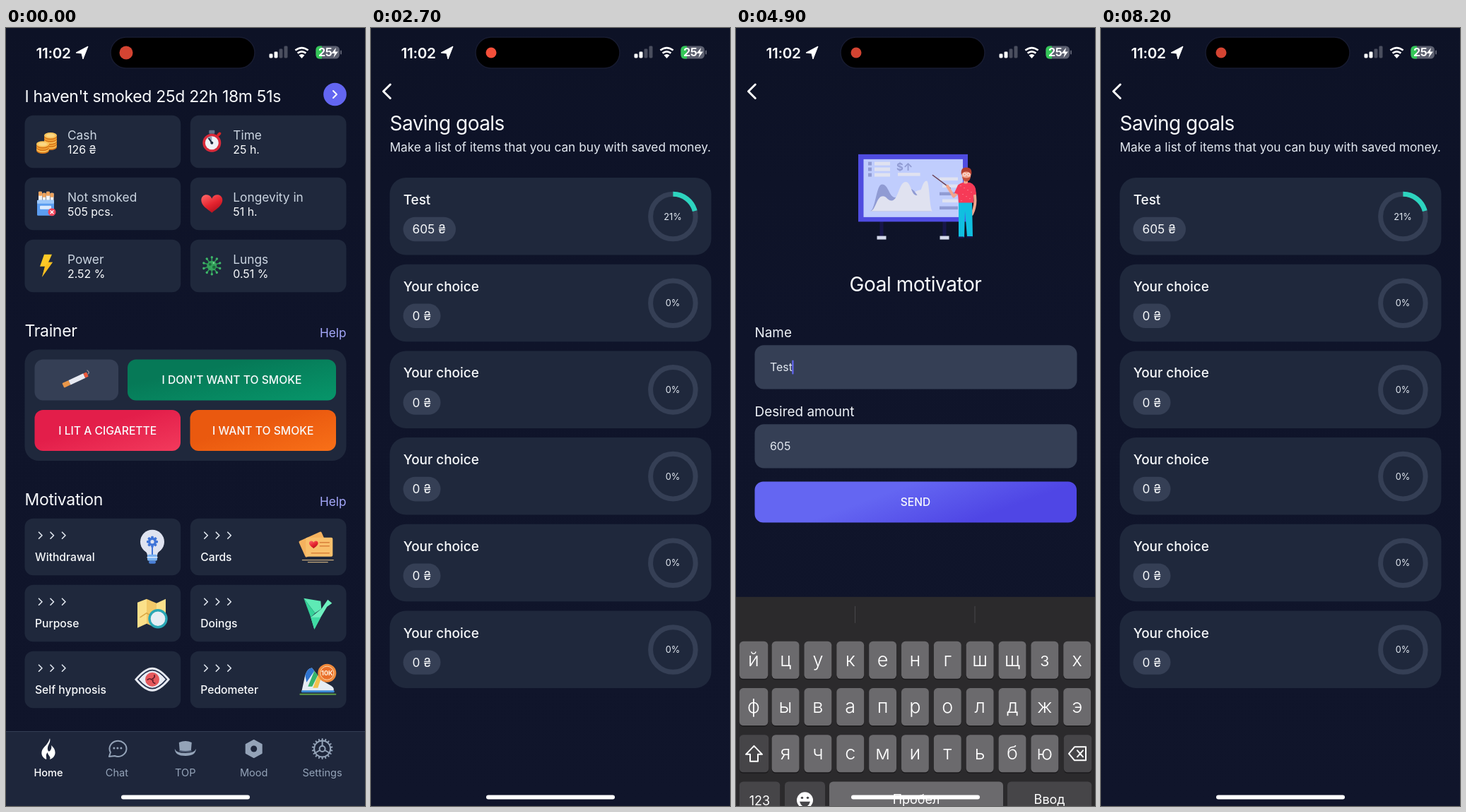
Write an HTML page that moves like this. It is 508 by 1102 pixels and loops after 8.3 s.

```html
<!DOCTYPE html>
<html lang="en">
<head>
<meta charset="utf-8">
<title>Saving goals</title>
<style>
html, body { margin: 0; width: 100%; height: 100%; overflow: hidden; background: #000; }
svg { display: block; width: 100vw; height: 100vh; font-family: Inter, Roboto, "Noto Sans", sans-serif; }
text { white-space: pre; }
</style>
</head>
<body>
<svg id="stage" viewBox="0 0 508 1102" xmlns="http://www.w3.org/2000/svg">
<defs>
  <linearGradient id="bg" x2="0" y2="1"><stop stop-color="#0d1226"/><stop offset=".4" stop-color="#0f142a"/><stop offset="1" stop-color="#10152b"/></linearGradient>
  <linearGradient id="green" x2="1" y2="1"><stop offset=".3" stop-color="#067957"/><stop offset="1" stop-color="#07966a"/></linearGradient>
  <linearGradient id="red" x2="1" y2="1"><stop offset=".4" stop-color="#e31e4a"/><stop offset="1" stop-color="#f23a5c"/></linearGradient>
  <linearGradient id="orange" x2="1" y2="1"><stop offset=".4" stop-color="#ea590f"/><stop offset="1" stop-color="#f87018"/></linearGradient>
  <linearGradient id="indigo" x2="1" y2=".35"><stop offset=".45" stop-color="#6466f2"/><stop offset=".9" stop-color="#4f46e5"/></linearGradient>
  <linearGradient id="heart" x2=".6" y2="1"><stop stop-color="#ff6b6b"/><stop offset=".6" stop-color="#e5242f"/><stop offset="1" stop-color="#b3121f"/></linearGradient>
</defs>
<g id="home"></g>
<g id="goals"></g>
<g id="form"></g>
<g id="backOld"></g>
<g id="backNew"></g>
<g id="status"></g>
</svg>
<script>
const LOOP = 8300, W = 508, H = 1102;
const $ = id => document.getElementById(id);
const CARD = '#1f283c', FIELD = '#353f55', SOFT = '#cbd5e1', GRAY = '#94a3b8', WHITE = '#f8fafc';

// Markup helpers
const rect = (x, y, w, h, r, fill, more = '') =>
  `<rect x="${x}" y="${y}" width="${w}" height="${h}" rx="${r}" fill="${fill}" ${more}/>`;
const circle = (x, y, r, fill, more = '') => `<circle cx="${x}" cy="${y}" r="${r}" fill="${fill}" ${more}/>`;
const oval = (x, y, rx, ry, fill, more = '') =>
  `<ellipse cx="${x}" cy="${y}" rx="${rx}" ry="${ry}" fill="${fill}" ${more}/>`;
const shape = (d, fill, more = '') => `<path d="${d}" fill="${fill}" ${more}/>`;
const line = (d, color, w = 2, more = '') =>
  `<path d="${d}" fill="none" stroke="${color}" stroke-width="${w}" stroke-linecap="round" stroke-linejoin="round" ${more}/>`;
const text = (x, y, s, size, fill = WHITE, more = '') =>
  `<text x="${x}" y="${y}" font-size="${size}" fill="${fill}" ${more}>${s}</text>`;
const mid = 'text-anchor="middle"', medium = 'font-weight="500"';
const at = (x, y, body, more = '') => `<g transform="translate(${x} ${y})" ${more}>${body}</g>`;
const spokes = (n, draw) => Array.from({length: n}, (_, i) =>
  `<g transform="rotate(${i * 360 / n})">${draw}</g>`).join('');
const heading = (y, s, more = '') => text(26.5, y, s, 23, WHITE, 'letter-spacing="-.33" ' + more);
const page = () => rect(0, 0, W, H, 0, 'url(#bg)');

// Icons, each around its own centre
function coins() {
  let s = '';
  const pile = (x, y, n) => {
    for (let i = 0; i < n; i++) {
      s += oval(x, y - i * 3.6 + 2, 9, 4.2, '#d97a1c') + oval(x, y - i * 3.6, 9, 4.2, i % 2 ? '#f5a93a' : '#fbc55c');
    }
    s += oval(x, y - (n - 1) * 3.6, 6, 2.5, '#fbd784');
  };
  pile(6, 6, 5);
  pile(-5, 11, 3);
  return s;
}
const stopwatch = () => rect(-4, -16, 8, 5, 1, '#64748b') + line('M9 -9L11 -11', '#dc2626', 4) +
  circle(0, 2, 13, '#d92a3a') + circle(0, 2, 9.5, '#eef2f7') + shape('M0 2V-7.5A9.5 9.5 0 0 0 -6.7 -4.7Z', '#94a3b8') +
  line('M0 2L-4 -4', '#1e293b', 2) + circle(0, 2, 2, '#1e293b');
function pack() {
  let s = '';
  for (let i = 0; i < 4; i++) s += rect(-11 + i * 5.5, -17 + i % 2 * 2, 5, 16, 1, '#f1f5f9') + rect(-11 + i * 5.5, -17 + i % 2 * 2, 5, 6, 1, '#f0a35b');
  return s + rect(-13, -5, 24, 22, 1.5, '#5b9df0') + rect(-13, -5, 24, 5, 1, '#9cc7fa') + rect(-9, 3, 16, 5, 1, '#dbeafe') +
    circle(8, 12, 5.5, '#f0445b') + line('M6 10L10 14M10 10L6 14', '#fff', 1.4);
}
const heart = () => shape('M0 13C-6 8 -15 3 -15 -5C-15 -14 -3 -15 0 -7C3 -15 15 -14 15 -5C15 3 6 8 0 13Z', 'url(#heart)');
const bolt = () => shape('M-3 -16H8L3 -5H9L-6 16L-2 1H-9Z', '#fcc927') + shape('M3 -5H9L-6 16L-2 1Z', '#f6b51c', 'opacity=".5"');
const virus = () => spokes(10, line('M0 -6V-12', '#2f9e57', 1.6) + circle(0, -12, 1.7, '#3fb76a')) +
  circle(0, 0, 7, '#35a35c') + circle(-2.5, -2, 2, '#1d6b3d') + circle(3, 2, 2.3, '#1d6b3d') + circle(2.5, -4, 1.2, '#7ddc9a');
const cigarette = () => `<g transform="rotate(-25)">${rect(-20, -3.5, 10, 7, 1, '#e9974a') + rect(-10, -3.5, 23, 7, 0, '#e8eaf2') +
  rect(13, -3.5, 5, 7, 1, '#ee5a3c')}</g>` + line('M17 -8Q20 -10 16 -13', '#8a8f9c', 1.5);
const bulb = () => circle(0, -7, 17, '#dfe3f0') + shape('M-11 4Q-7 9 -7 13H7Q7 9 11 4Z', '#dfe3f0') +
  at(0, -7, spokes(8, rect(-1.8, -8, 3.6, 5, 1, '#3f74d8')) + circle(0, 0, 6, '#3f74d8') + circle(0, 0, 2.6, '#dfe3f0')) +
  line('M0 0V13', '#3f74d8', 2) + rect(-7, 11, 14, 9, 2, '#7bb2f0') + rect(-5, 20, 10, 4, 2, '#4a7fd6') + line('M-7 15H7', '#dbeafe', 1.5);
const cards = () => `<g transform="rotate(-24)">${rect(-22, -18, 35, 25, 2, '#f5b25e')}</g>` +
  rect(-17, -13, 38, 27, 2, '#f9c06c') + at(-6, -3, `<g transform="scale(.42)">${heart()}</g>`) +
  line('M3 -6H16M3 -1H16M-9 9H16', '#d9813b', 1.6) + line('M-22 19H22M-14 22H14', '#f1c98d', 1);
const map = () => shape('M-21 -15L-8 -20V15L-21 21Z', '#fbe08a') + shape('M-8 -20L6 -14V21L-8 15Z', '#f2c968') +
  shape('M6 -14L19 -20V15L6 21Z', '#fbe08a') + line('M-17 6L-8 0L-2 4', '#d9a441', 1.4) +
  circle(8, 8, 12, '#e6eef4', 'stroke="#2aa7b5" stroke-width="3.4"');
const bird = () => shape('M-20 -21L4 -17L5 -6L-4 0Z', '#5eeab5') + shape('M-20 -21L-4 0L-10 6Z', '#34d399') +
  shape('M-10 6L5 -6L14 -19L20 -14L13 -9L4 6L-5 23Z', '#6ff0c0') + shape('M-10 6L4 6L-5 23Z', '#3fdca4');
const eye = () => shape('M-25 0Q-11 -17 0 -17Q11 -17 25 0Q11 17 0 17Q-11 17 -25 0Z', '#e8ebf3') +
  shape('M-20 0Q-9 -13 0 -13Q9 -13 20 0Q9 13 0 13Q-9 13 -20 0Z', '#e8ebf3', 'stroke="#27324c" stroke-width="1.8"') +
  circle(0, 0, 10, '#e5585c') + spokes(3, line('M0 -1Q4 -2 3 -6', '#5a1a28', 1.6));
const shoe = () => shape('M-23 17L-18 -6Q-14 -17 -8 -16L5 1L19 9Q24 12 22 17Z', '#e6edf5') +
  shape('M-18 -6Q-14 -17 -8 -16L-5 -12L-16 4Z', '#2f74d0') + shape('M-5 -12L0 -6L-8 10H-14Z', '#35b36b') + shape('M0 -6L4 0L0 12H-7Z', '#f2c14d') +
  line('M-25 21H25', '#5e9c46', 2) + line('M-22 17H22', '#3a8ad6', 3) +
  circle(13, -9, 13, '#f08a3c') + circle(13, -9, 9.5, '#ea6f2a', 'stroke="#ffd8a8" stroke-width="1"') +
  text(13, -5.5, '10K', 9, '#fff3e0', mid + ' font-weight="700"');

const tabIcons = [
  () => shape('M2 -15C4 -8 -2 -6 -1 1Q0 6 3 2Q5 -1 4 -5C9 -1 12 6 7 12Q5 14 2 15C4 10 -1 10 -1 5C-5 9 -2 12 -3 15C-11 11 -11 4 -7 -1C-3 -6 0 -8 2 -15Z', '#fff'),
  () => line('M-11 11L-9 5A12 11 0 1 1 -3 10Z', GRAY, 2) + circle(-4, -1, 1.5, GRAY) + circle(1, -1, 1.5, GRAY) + circle(6, -1, 1.5, GRAY),
  () => shape('M-9 -9Q0 -13 9 -9L8 3H-8Z', GRAY) + shape('M-15 0Q-13 6 0 6Q13 6 15 0Q15 10 0 10Q-15 10 -15 0Z', GRAY) + line('M-8 3Q0 5 8 3', '#4b5870', 2),
  () => shape('M0 -12L11 -6V6L0 12L-11 6V-6Z', GRAY, `stroke="${GRAY}" stroke-width="2" stroke-linejoin="round"`) + circle(0, 0, 4.5, '#1e263b'),
  () => spokes(18, line('M0 -12V-14', GRAY, 2)) + circle(0, 0, 11.5, 'none', `stroke="${GRAY}" stroke-width="2"`) +
    spokes(3, line('M0 -4V-11', GRAY, 2)) + circle(0, 0, 4, 'none', `stroke="${GRAY}" stroke-width="2"`)
];

function buildHome() {
  let s = page() + heading(105, '', 'id="counter"') + circle(465.5, 94, 16.3, '#6366f1') + line('M463 89L468 94L463 99', '#fff', 2);
  [['Cash', '126 ₴', coins], ['Time', '25 h.', stopwatch], ['Not smoked', '505 pcs.', pack],
   ['Longevity in', '51 h.', heart], ['Power', '2.52 %', bolt], ['Lungs', '0.51 %', virus]].forEach(([name, value, icon], i) => {
    const x = 26.5 + i % 2 * 234.3, y = 123.7 + (i >> 1) * 88;
    s += rect(x, y, 220.7, 74.5, 12, CARD) + at(x + 30.5, y + 37, icon()) +
      text(x + 60.5, y + 34.5, name, 17.3, SOFT) + text(x + 60.5, y + 54, value, 15.9, WHITE);
  });
  const help = y => text(481.5, y, 'Help', 17.2, '#a5a8fb', 'text-anchor="end"');
  s += heading(437, 'Trainer') + help(438) + rect(26.5, 455.5, 455, 157.5, 20, CARD) +
    rect(40.5, 469.5, 118.5, 58, 12, FIELD) + at(99, 498, cigarette());
  [[172, 469.5, 295, 'green', "I DON'T WANT TO SMOKE"], [40.5, 541, 206.5, 'red', 'I LIT A CIGARETTE'],
   [260.5, 541, 206.5, 'orange', 'I WANT TO SMOKE']].forEach(([x, y, w, fill, label]) => {
    s += rect(x, y, w, 58, 12, `url(#${fill})`) + text(x + w / 2, y + 34.5, label, 15.7, WHITE, mid + ' ' + medium);
  });
  s += heading(676, 'Motivation') + help(677);
  [['Withdrawal', bulb], ['Cards', cards], ['Purpose', map], ['Doings', bird], ['Self hypnosis', eye], ['Pedometer', shoe]].forEach(([name, icon], i) => {
    const x = i % 2 * 234.3, y = 694.7 + (i >> 1) * 94;
    let body = rect(26.5, 0, 220.7, 80.5, 12, CARD) + at(207, 40, icon()) + text(41, 60.5, name, 15.65, WHITE, medium);
    for (let j = 0; j < 3; j++) body += line(`M${46.5 + j * 16.5} 19.5l4.5 4.5l-4.5 4.5`, '#e2e8f0', 1.6);
    s += at(x, y, body, name === 'Purpose' ? 'id="purpose"' : '');
  });
  s += rect(0, 996, W, 106, 0, '#1e263b') + rect(0, 996, W, 1, 0, '#343e54');
  ['Home', 'Chat', 'TOP', 'Mood', 'Settings'].forEach((name, i) => {
    const x = 60 + i * 96.9;
    s += at(x, 1021, tabIcons[i]()) + text(x, 1060, name, 14.6, i ? GRAY : '#fff', mid + (i ? '' : ' ' + medium));
  });
  return s + rect(0, 0, W, H, 0, '#000', 'id="homeDim"');
}

function buildGoals() {
  let s = page() + text(26.5, 144.5, 'Saving goals', 28, WHITE, 'letter-spacing="-.55"') +
    text(26.5, 174.5, 'Make a list of items that you can buy with saved money.', 17.25, '#e2e8f0');
  for (let i = 0; i < 6; i++) {
    const y = 212 + i * 122.7, r = 31.8, len = 2 * Math.PI * r;
    s += rect(26.5, y, 455, 109.5, 23, CARD) + text(45.7, y + 38, i ? 'Your choice' : 'Test', 18.9, WHITE, medium) +
      rect(45.5, y + 55.7, i ? 53 : 74.5, 34.6, 17.3, FIELD) + text(58.5, y + 79.2, i ? '0 ₴' : '605 ₴', 17.2) +
      circle(427.4, y + 55, r, 'none', `stroke="${FIELD}" stroke-width="7"`) +
      text(427, y + 59.6, i ? '0%' : '21%', 12.8, '#e2e8f0', mid);
    if (!i) s += circle(427.4, y + 55, r, 'none', `stroke="#2dd4bf" stroke-width="7" stroke-dasharray="${len * .21} ${len}" transform="rotate(-90 427.4 ${y + 55})"`);
  }
  return rect(0, 0, W, H, 0, '#000') + `<g id="goalsBody">${s}</g>` + rect(0, 0, 670, H, 0, '#000', 'id="cut"') +
    rect(0, 0, W, H, 0, '#000', 'id="goalsDim"');
}

function buildKeyboard() {
  const key = (x, y, w, fill) => rect(x, y + 1.5, w, 53, 5.5, '#1b1a1c') + rect(x, y, w, 53, 5.5, fill);
  const light = '#6b6a6d', dark = '#464548', pitch = 45.85;
  let s = rect(0, 0, W, 420, 0, '#2b2a2c') + rect(168, 13, 1, 24, 0, '#48474a') + rect(337.5, 13, 1, 24, 0, '#48474a');
  ['йцукенгшщзх', 'фывапролджэ', ' ячсмитьбю'].forEach((row, r) => [...row].forEach((c, i) => {
    if (c === ' ') return;
    const x = 4.8 + i * pitch, y = 63 + r * 66.2;
    s += key(x, y, i ? 38.8 : 40.5, light) + text(x + (i ? 19.4 : 20.2), y + 35, c, 27, '#fff', mid + ' font-weight="300"');
  }));
  s += key(4.8, 195.4, 41.5, dark) + line('M25.5 211L37 223H31V233H20V223H14Z', '#fff', 2) +
    key(463.8, 195.4, 39.5, dark) + line('M471 222L479 212.5H495V231.5H479ZM483 217.5L491 226.5M491 217.5L483 226.5', '#fff', 2);
  s += key(4.8, 261.6, 57.5, dark) + text(33.5, 295, '123', 18, '#fff', mid) +
    key(69, 261.6, 57, dark) + circle(97.5, 288, 11.5, '#fff') + circle(93.5, 284.5, 1.7, dark) + circle(101.5, 284.5, 1.7, dark) + shape('M90 290H105Q103 297 97.5 297Q92 297 90 290Z', dark) +
    key(132, 261.6, 246, light) + text(255, 293.5, 'Пробел', 18, '#fff', mid) +
    key(384, 261.6, 119.3, dark) + text(443.5, 293.5, 'Ввод', 18, '#fff', mid);
  return s + at(50, 362, [15, 7].map(r => oval(0, 0, r, 15, 'none', 'stroke="#fff" stroke-width="1.7"')).join('') +
    line('M0 -15V15M-15 0H15M-12.5 -8Q0 -4 12.5 -8M-12.5 8Q0 4 12.5 8', '#fff', 1.7));
}

function buildForm() {
  const field = (y, label, value) => text(26.5, y, label, 18.9, '#eef2f7') + rect(26.5, y + 11.7, 456, 62.3, 13, FIELD) +
    text(48, y + 48.5, value, 15.9, '#e2e8f0');
  return page() + `<g id="formBody"><g id="art"></g>` + text(254, 515, 'Goal motivator', 28, WHITE, mid + ' letter-spacing="-.45"') +
    field(580, 'Name', 'Test') + field(692, 'Desired amount', '605') +
    rect(79.3, 613, 2.2, 20, 1, '#6366f1', 'id="caret"') +
    rect(26.5, 785, 455.5, 58, 12, 'url(#indigo)') + text(254, 819.8, 'SEND', 15.5, WHITE, mid + ' ' + medium) +
    `</g><g id="keys">${buildKeyboard()}</g>`;
}

function buildStatus() {
  let s = text(42.5, 42.5, '11:02', 20.7, '#fff', 'font-weight="600" letter-spacing="-.3"') + shape('M116 26L109 44L107 36L99 35Z', '#fff', 'stroke="#fff" stroke-linejoin="round"') +
    rect(148, 13, 204, 44, 22, '#000', 'stroke="#171b30" stroke-width="1.5"') + circle(170, 35, 7.5, '#fb513b', 'id="dot"');
  [6, 9, 13, 17].forEach((h, i) => s += rect(372.5 + i * 7, 42.5 - h, 5, h, 1.4, i < 2 ? '#fff' : '#4a4e5e'));
  s += shape('M418.5 43L414.5 38.5Q418.5 35.5 422.5 38.5Z', '#fff') + line('M412.6 35.6Q418.5 31 424.4 35.6M409.4 31.6Q418.5 24.5 427.6 31.6', '#fff', 2.6, 'style="stroke-linecap:butt"');
  s += rect(438.5, 25.5, 33.5, 18, 5.5, '#5c6070') + shape('M447 25.5H444Q438.5 25.5 438.5 31V38Q438.5 43.5 444 43.5H447Z', '#35c759') +
    rect(473, 31.5, 2, 6, 1, '#5c6070') + text(442, 40.3, '25', 16, '#fff', 'font-weight="700" letter-spacing="-.4"') +
    shape('M467 28L460.5 36H465L463.5 42L470 33.5H465.8Z', '#fff');
  return s + rect(163, 1086.5, 182, 6, 3, '#fff');
}

const clamp = v => Math.max(0, Math.min(1, v));
const ramp = (t, a, b) => clamp((t - a) / (b - a));
const mix = (a, b, k) => a + (b - a) * k;
// Critically damped spring from 0 to 1
const spring = (t, start) => {
  const x = Math.max(0, t - start) * .01826;
  return x > 10 ? 1 : 1 - (1 + x) * Math.exp(-x);
};

// Hill outline on the board, blended between two poses with equal point counts
function wave(a, b, k, fill) {
  let d = 'M189 402', px = 189, py = 402;
  [...a, [278, 402]].forEach(([ax, ay], i) => {
    const [bx, by] = b[i] || [ax, ay];
    const x = mix(ax, bx, k), y = mix(ay, by, k), m = (px + x) / 2;
    d += `C${m} ${py} ${m} ${y} ${x} ${y}`;
    px = x; py = y;
  });
  return shape(d + 'Z', fill);
}

function art(t) {
  const u = ((t - 3000) / 3900 % 1 + 1) % 1;
  const k = .5 - .5 * Math.cos(2 * Math.PI * (u - .08));
  const grow = ramp(u, .1, .35) * (1 - ramp(u, .85, .97));
  const blue = '#909bd3', pale = '#e0e2f0', skin = '#f3a48c';
  let s = '';
  for (const x of [206, 295]) s += rect(x - 2.5, 416, 5, 22, 0, '#17164a') + rect(x - 6.5, 437, 13, 5, 0, '#d5d9ec');
  s += rect(173, 321.3, 155, 95.5, 0, '#4f4ce0') + rect(180.5, 328.3, 140.5, 82, 0, '#c0cdfd');
  s += wave([[206, 363], [232, 384], [268, 357]], [[207, 376], [224, 386], [270, 372]], k, pale);
  s += wave([[204, 374], [222, 388], [241, 361], [262, 385]], [[207, 363], [226, 382], [246, 371], [264, 383]], k, blue);
  s += wave([[204, 388], [222, 397], [242, 376], [260, 394], [268, 392]], [[208, 380], [220, 386], [240, 359], [255, 378], [270, 356]], k, pale);
  s += text(227, 344, '$↑', 15, blue, 'font-weight="700"') + rect(229, 347.5, mix(27, 32, k), 4.5, 0, pale);
  for (let i = 0; i < 3; i++) s += rect(187, 332 + i * 8, 5, 5, 0, blue, `opacity="${.2 + .8 * grow}"`) + rect(196, 332 + i * 8, 22 * grow, 5, 0, pale);
  [354, 364, 375, 385, 395].forEach((y, i) => s += rect(288 + (i % 2 ? 4 : 0), y, 26 - i % 2 * 4, 4.5, 0, i === 2 || i === 4 ? blue : pale));
  // Presenter
  const hx = mix(300, 299, k), hy = mix(370, 366, k);
  s += line('M337 374Q341 392 334 406', skin, 4) + shape('M315 389H334L335 438H327L324 402L323 439H315Z', '#10bfe0') +
    rect(313.5, 438, 9, 2.5, 1, '#17164a') + rect(326, 437.5, 9, 2.5, 1, '#17164a') +
    line(`M${mix(272, 279, k)} ${mix(361, 350, k)}L${hx + 4} ${hy + 3}`, '#6b3f52', 1.5) +
    line(`M316 373L308 381L${hx} ${hy}`, skin, 4) +
    shape('M314 365Q319 361 325 361Q336 360 339 370L340 378L336 379V390H315L314 378L309 376Z', '#f63a57');
  for (let i = 0; i < 8; i++) s += circle(318 + i * 5 % 17, 366 + i * 3, .7, '#ff9aa8');
  return s + rect(322, 355, 6, 8, 2, skin) + oval(326, 350, 6.5, 8, skin) + shape('M319 351Q317 340 326 340Q335 340 333 351Q331 346 326 346Q320 346 319 351Z', '#b4402f') +
    shape('M320 353Q326 357 332 353Q331 360 326 360Q321 360 320 353Z', '#c4503a') +
    circle(323.5, 350, 2, 'none', 'stroke="#fff" stroke-width=".8"') + circle(329, 350, 2, 'none', 'stroke="#fff" stroke-width=".8"');
}

$('home').innerHTML = buildHome();
$('goals').innerHTML = buildGoals();
$('form').innerHTML = buildForm();
$('status').innerHTML = buildStatus();
for (const id of ['backOld', 'backNew']) $(id).innerHTML = line('M27.3 80L17.5 89.7L27.3 99.5', '#fff', 3);

const move = (id, x, y = 0) => $(id).setAttribute('transform', `translate(${x} ${y})`);
const fade = (id, v) => $(id).setAttribute('opacity', v);
const POP = 7146.2;

function draw(t) {
  const toGoals = spring(t, 1163.8), toForm = spring(t, 3024), back = spring(t, POP);
  const over = t < POP ? toForm : 1 - back;
  const lift = spring(t, 4761);

  $('counter').textContent = `I haven't smoked 25d 22h 18m ${t < 600 ? 51 : 52}s`;
  fade('purpose', 1 - .8 * ramp(t, 1000, 1150));
  move('home', -.3 * W * toGoals);
  fade('homeDim', .1 * toGoals);

  move('goals', W * (1 - toGoals) - .3 * W * over);
  fade('goalsBody', ramp(t, 1184, 1480));
  fade('goalsDim', .1 * over);
  $('cut').setAttribute('y', t < 5000 ? H : mix(786, H, spring(t, 7600)));

  move('form', W * (1 - over));
  move('formBody', 0, -158 * spring(t, 4687));
  move('keys', 0, 693 + 409 * (1 - lift));
  fade('caret', t > 4700 && t < POP && Math.floor((t - 4700) / 500) % 2 === 0 ? 1 : 0);
  $('art').innerHTML = over > 0 ? art(t) : '';

  move('backOld', W * (1 - toGoals));
  fade('backOld', over > 0 ? (1 - over) ** 2 : 1);
  move('backNew', 11 * (1 - over));
  fade('backNew', t < 3024 ? 0 : 1 - (1 - over) ** 2);

  fade('dot', .92 - .08 * Math.cos(2 * Math.PI * (t - 80) / 1610));
  $('dot').setAttribute('r', mix(9.5, 7.5, ramp(t, 100, 500)));
}

const begin = performance.now();
function tick() {
  draw((performance.now() - begin) % LOOP);
  requestAnimationFrame(tick);
}
tick();
</script>
</body>
</html>
```
